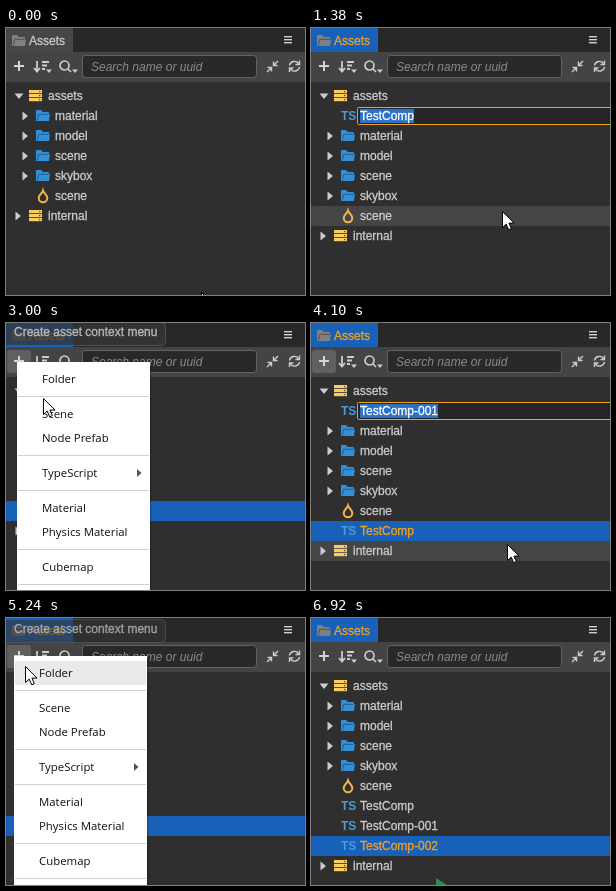
An HTML page with a canvas that plays this animation: 299x267 px, repeating every 7.47 s.

```html
<!DOCTYPE html>
<html lang="en">
<head>
<meta charset="utf-8">
<title>Assets panel</title>
<style>
  html, body { margin: 0; width: 100%; height: 100%; overflow: hidden; background: #2f2f30; }
  canvas { display: block; }
</style>
</head>
<body>
<canvas id="stage" width="299" height="267"></canvas>
<script>
const W = 299, H = 267, LOOP = 7470;
const g = document.getElementById('stage').getContext('2d');
const UI = '"Liberation Sans", Arial, sans-serif';
const MENU_FONT = '11.4px "Open Sans", "Noto Sans", sans-serif';
const BLUE = '#1960b8', ORANGE = '#f5a11c', TEXT = '#cccccc';
const MENU_W = 133;
const MENU = ['Folder', '-', 'Scene', 'Node Prefab', '-', 'TypeScript', '-',
  'Material', 'Physics Material', '-', 'Cubemap', '-'];
const SUBMENU = ['NewComponent', 'TestComp', '-', 'Help'];

// Each job: open the menu, show the submenu, pick the template, confirm the name, finish.
const jobs = [
  { name: 'TestComp', x: 18, y: 42, open: 430, sub: 985, pick: 1380, ok: 1930, done: 2230 },
  { name: 'TestComp-001', x: 11, y: 39, open: 2812, sub: 3230, pick: 4100, ok: 4320, done: 4550 },
  { name: 'TestComp-002', x: 8, y: 38, open: 5090, sub: 5480, pick: 6160, ok: 6610, done: 6760 }
];

// Pointer path: time, x, y
const path = [
  [0, 196, 265], [70, 190, 250], [400, 18, 42], [530, 18, 43], [680, 31, 66], [760, 36, 88],
  [910, 50, 152], [1060, 120, 157], [1210, 192, 184], [1380, 192, 184], [1780, 117, 240],
  [2300, 117, 240], [2610, 20, 62], [2690, 12, 41], [2812, 11, 39], [3000, 38, 76],
  [3160, 55, 148], [3400, 146, 152], [3870, 197, 186], [4099, 197, 186], [4100, 197, 222],
  [4550, 197, 222], [5010, 12, 42], [5090, 8, 38], [5240, 20, 48], [5400, 45, 147],
  [5790, 160, 160], [5930, 195, 184], [6160, 195, 184], [6460, 128, 259],
  [6760, 128, 259], [6920, 125, 260]
];

function pointerAt(t) {
  const i = path.findIndex(p => p[0] > t);
  if (i < 0) return path[path.length - 1].slice(1);
  const [t0, x0, y0] = path[i - 1], [t1, x1, y1] = path[i];
  const k = (t - t0) / (t1 - t0);
  return [Math.round(x0 + (x1 - x0) * k), Math.round(y0 + (y1 - y0) * k)];
}

function rect(x, y, w, h, color) {
  g.fillStyle = color;
  g.fillRect(x, y, w, h);
}

function box(x, y, w, h, r, fill, stroke) {
  g.beginPath();
  g.roundRect(x + .5, y + .5, w - 1, h - 1, r);
  g.fillStyle = fill;
  g.fill();
  g.strokeStyle = stroke;
  g.lineWidth = 1;
  g.stroke();
}

// "heavy" thickens the glyphs slightly without changing their widths.
function text(s, x, y, { color = TEXT, font = '12px ' + UI, heavy = 0 } = {}) {
  g.font = font;
  g.fillStyle = g.strokeStyle = color;
  g.fillText(s, x, y);
  if (!heavy) return;
  g.lineWidth = heavy;
  g.strokeText(s, x, y);
}

function shape(d, x, y, fill, stroke, width = 1.5) {
  const p = new Path2D(d);
  g.save();
  g.translate(x, y);
  if (fill) { g.fillStyle = fill; g.fill(p); }
  if (stroke) { g.strokeStyle = stroke; g.lineWidth = width; g.stroke(p); }
  g.restore();
}

const triangleDown = (x, y) => shape('M-4.5-2.5h9L0 3z', x, y, TEXT);
const triangleRight = (x, y) => shape('M-2.5-4.5v9L3 0z', x, y, TEXT);
const caret = (x, y) => shape('M-3-1.5h6L0 2z', x, y, TEXT);
const folder = (x, y, color, line) => {
  shape('M0 1q0-1 1-1h4l2 2h5q1 0 1 1v1h1l-1 7H0z', x, y, color);
  shape('M1.5 10.5L2.5 4.3H13.5', x, y, null, line, .9);
};

function header(active) {
  rect(0, 0, W, 24, '#282828');
  rect(0, 0, 67, 24, active ? BLUE : '#474747');
  folder(6, 7, '#808080', '#4c4c4c');
  text('Assets', 23, 17, { color: active ? ORANGE : TEXT, heavy: .3 });
  for (const y of [8, 11, 14]) rect(278, y, 8, 1.4, '#d0d0d0');
}

function toolbar(hot) {
  rect(0, 24, W, 30, '#444444');
  if (hot) box(1, 27, 24, 23, 2, '#606060', '#606060');
  rect(8, 37, 10, 2, '#d4d4d4');
  rect(12, 33, 2, 10, '#d4d4d4');
  shape('M3 0V10M0 7L3 10.5L6 7M8 1H15M8 4.5H13M8 8H11', 28, 33, null, TEXT, 1.8);
  caret(43, 43);
  shape('M9 4.5a4.5 4.5 0 1 1-9 0a4.5 4.5 0 1 1 9 0M8 8L11 11', 54, 33, null, TEXT, 1.7);
  caret(69, 43);
  box(76, 27, 175, 23, 3, '#292929', '#626262');
  text('Search name or uuid', 85, 43, { color: '#8a8a8a', font: 'italic 12px ' + UI });
  shape('M11 0L7 4M6.5 0.5V4.5H10.5M0 11L4 7M0.5 6.5H4.5V10.5', 261, 33, null, TEXT, 1.4);
  shape('M0.5 5A5 5 0 0 1 9.5 3M10.5 0V4H6.5M10.5 6.5A5 5 0 0 1 1.5 8.5M.5 11.5V7.5H4.5',
    283, 32.5, null, TEXT, 1.4);
}

function icon(kind, y) {
  if (kind === 'db') {
    for (const dy of [-6, -2, 2]) {
      rect(23, y + dy, 13, 3.2, '#f8cd62');
      rect(33, y + dy + 1, 1.4, 1.2, '#5b4a20');
    }
  } else if (kind === 'folder') folder(30, y - 6, '#338fd6', '#1f5c8c');
  else if (kind === 'fire') {
    shape('M0-5.5C1-2.5 4.3-1 4.3 2A4.3 4.3 0 0 1-4.3 2C-4.3 0-2.8-1-2-2.5Q-.5-3.5 0-5.5z',
      37, y, null, '#f3b54c', 2);
  } else text('TS', 30, y + 4, { color: '#4a9cd6', font: 'bold 12px ' + UI });
}

function nameField(job, y, t) {
  const busy = t >= job.ok, x = busy ? 42 : 46;
  if (busy) {
    const a = t / 130;
    g.lineWidth = 2.5;
    for (const [from, to, color] of [[0, 6.3, '#555555'], [a, a + 1.6, '#8a6a3c']]) {
      g.beginPath();
      g.arc(36, y, 5.5, from, to);
      g.strokeStyle = color;
      g.stroke();
    }
  } else icon('ts', y);
  box(x, y - 9, W - x + 4, 18, 1, '#262626', ORANGE);
  if (busy) return text(job.name, 46, y + 4, { color: ORANGE });
  g.font = '12px ' + UI;
  rect(49, y - 7, g.measureText(job.name).width, 14, '#2a72c8');
  text(job.name, 49, y + 4, { color: '#ffffff', heavy: .3 });
}

function tree(t, py, menuOpen) {
  const files = jobs.filter(j => t >= j.done);
  const editing = jobs.find(j => t >= j.pick && t < j.done);
  const selected = files[files.length - 1];
  const rows = [
    { label: 'assets', kind: 'db', open: true },
    ...(editing ? [{ job: editing }] : []),
    ...['material', 'model', 'scene', 'skybox'].map(label => ({ label, kind: 'folder' })),
    { label: 'scene', kind: 'fire' },
    ...files.map(j => ({ label: j.name, kind: 'ts', selected: j === selected })),
    { label: 'internal', kind: 'db' }
  ];
  rows.forEach((row, i) => {
    const y = 68 + 20 * i;
    const over = !menuOpen && py >= y - 10 && py < y + 10;
    if (row.selected) rect(0, y - 10, W, 20, BLUE);
    else if (over && !row.job) rect(0, y - 10, W, 20, '#454545');
    if (row.job) return nameField(row.job, y, t);
    if (row.open) triangleDown(13, y);
    else if (row.kind === 'db') triangleRight(12, y);
    else if (row.kind === 'folder') triangleRight(19, y);
    icon(row.kind, y);
    text(row.label, row.kind === 'db' ? 42 : 49, y + 4,
      { color: row.selected ? ORANGE : TEXT, heavy: .3 });
  });
}

function popup(x, y, items, px, py, forced) {
  const h = 10 + items.reduce((sum, s) => sum + (s === '-' ? 11 : 24), 0);
  g.save();
  g.shadowColor = 'rgba(0,0,0,.3)';
  g.shadowBlur = 2;
  g.shadowOffsetX = g.shadowOffsetY = 1;
  rect(x, y, MENU_W, h, '#ffffff');
  g.restore();
  let top = y + 5;
  for (const s of items) {
    if (s === '-') {
      rect(x + 1, top + 5, MENU_W - 2, 1, '#d0d0d0');
      top += 11;
      continue;
    }
    const over = px >= x && px < x + MENU_W && py >= top && py < top + 24;
    if (forced ? s === forced : over) rect(x + 1, top, MENU_W - 2, 24, '#e9e9e9');
    text(s, x + 25, top + 16, { color: '#101010', font: MENU_FONT });
    if (s === 'TypeScript') shape('M-2-4v8L2.5 0z', x + 122, top + 12, '#555555');
    top += 24;
  }
}

// Rises into place while it fades in.
function tooltip(alpha) {
  g.save();
  g.globalAlpha = alpha;
  g.translate(0, Math.round(12 * (1 - alpha)));
  box(-4, -4, 164, 24, 4, '#353535', '#5c5c5c');
  text('Create asset context menu', 8, 10, { color: '#d2d2d2', heavy: .4 });
  g.restore();
}

function pointer(x, y) {
  if (y > 258 && x < 150) return shape('M0 0V17L11 7z', x, y, '#2a8a5c');
  shape('M0 0V16L3.7 12.6L6.2 18.3L8.8 17.1L6.4 11.6H11.5z', x - .5, y - .5, '#ffffff', '#000000', 1);
}

function draw(t) {
  const [px, py] = pointerAt(t);
  const job = jobs.find(j => t >= j.open && t < j.pick);
  const overPlus = px < 25 && py >= 27 && py < 50;
  rect(0, 0, W, H, '#2f2f30');
  header(t >= jobs[0].open);
  toolbar(job || overPlus || (t >= 4100 && t < 4170));
  tree(t, py, job);
  if (job) {
    const sub = t >= job.sub;
    tooltip(Math.min(1, (t - job.open) / 250));
    popup(job.x, job.y, MENU, px, py, sub && 'TypeScript');
    if (sub) popup(job.x + MENU_W - 3, job.y + 98, SUBMENU, px, py);
  }
  pointer(px, py);
}

const start = performance.now();
function tick() {
  draw((performance.now() - start) % LOOP);
  requestAnimationFrame(tick);
}
tick();
</script>
</body>
</html>
```
